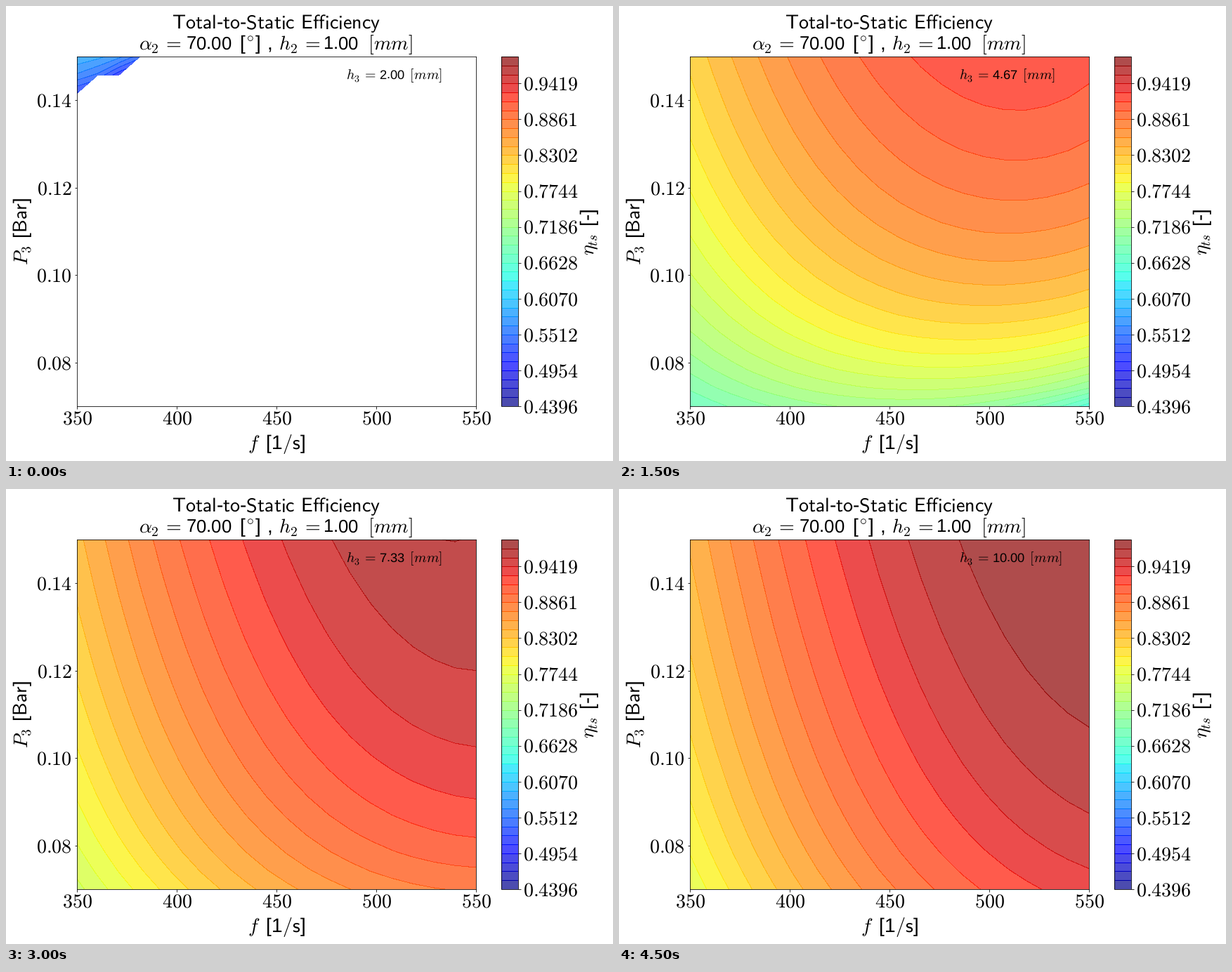
A matplotlib script for the animation above (5000 ms loop, 864 by 648 pixels).

```python
import numpy as np
import matplotlib.pyplot as plt
from matplotlib.animation import FuncAnimation

W, H, DPI = 864, 648, 72
SIZE, NOTE_SIZE = 28, 20
SP = r"\hspace{0.38}"
EQ = r"\hspace{0.18}=\hspace{0.18}"

plt.rcParams.update({
    "font.family": "Liberation Sans",
    "mathtext.fontset": "cm",
    "font.size": SIZE,
    "text.hinting": "none",
})

freq = np.linspace(350, 550, 20)
pres = np.linspace(0.07, 0.15, 20)
F, P = np.meshgrid(freq, pres)
heights = np.linspace(2, 10, 10)
levels = np.linspace(0.43956, 0.98373, 40)


def efficiency(h):
    """Loss-free turbine: only the exit kinetic energy is wasted.

    Velocities are scaled so that the inlet swirl work equals F.
    """
    drop = 554.2 + 95 * np.log(0.15 / P)            # isentropic enthalpy drop
    axial = 3.257 * (0.1 / P) ** 1.73 / h ** 2      # axial exit loss
    blade2 = 3.785e-4 * F ** 2
    rel2 = blade2 + drop * (1 - axial) - F          # squared relative swirl
    rel = np.sqrt(np.where(rel2 >= 0, rel2, np.nan))
    swirl = np.sqrt(blade2) - rel
    eta = 1 - axial - swirl ** 2 / drop
    return np.ma.masked_invalid(np.clip(eta, levels[0], levels[-1]))


fig = plt.figure(figsize=(W / DPI, H / DPI), dpi=DPI, facecolor="white")


def axes_px(x0, y0, x1, y1):
    return fig.add_axes([x0 / W, 1 - y1 / H, (x1 - x0) / W, (y1 - y0) / H])


def label(x, y, s, size=SIZE, ha="center", rotation=0):
    return fig.text(x / W, 1 - y / H, s, fontsize=size, ha=ha, va="baseline",
                    rotation=rotation, rotation_mode="anchor")


def sans(number):
    return r"$\mathdefault{%s}$" % number


def blank(number):
    """Room in a formula for a sans number that is set on its own."""
    em = 0.5 * (len(number) - 1) + 0.278
    return r"\hspace{%.3f}" % (em / 0.878)


ax = axes_px(101, 72, 669, 570)
cax = axes_px(704.6, 72, 729.4, 570)


def fill(h):
    return ax.contourf(F, P, efficiency(h), levels=levels, cmap="jet", alpha=0.7)


contours = fill(heights[0])
bar = fig.colorbar(contours, cax=cax)
bar.solids.set(edgecolor="face", linewidth=0.5, antialiased=True)
bar.set_ticks(levels[::4], labels=[f"${v:.4f}$" for v in levels[::4]])
bar.minorticks_off()

xticks = np.arange(350, 551, 50)
yticks = np.arange(0.08, 0.15, 0.02)
ax.set_xticks(xticks, [f"${v}$" for v in xticks])
ax.set_yticks(yticks, [f"${v:.2f}$" for v in yticks])
ax.tick_params(axis="x", pad=2.5)
ax.set_xlim(350, 550)
ax.set_ylim(0.07, 0.15)

label(384.5, 32, r"$\mathsf{Total}$-$\mathsf{to}$-$\mathsf{Static}" + SP
      + r"\mathsf{Efficiency}$")
label(384.5, 62,
      r"$\alpha_2" + EQ + blank("70.00") + SP
      + r"$[$\hspace{-0.08}{}^\circ\hspace{-0.14}$]$" + SP + "$,$" + SP
      + "h_2" + EQ + blank("1.00") + SP + "[mm]$")
label(256.5, 62, sans("70.00"), 0.92 * SIZE, "left")
label(450.5, 62, sans("1.00"), 0.92 * SIZE, "left")
label(384.5, 631.5, r"$f\hspace{0.5}$[1$\mathsf{/s}$]")
label(31, 321, "$P_3" + SP + r"$[$\mathsf{Bar}$]", rotation=90)
label(838, 321.5, r"$\eta_{ts}" + SP + "$[-]", rotation=90)
note = label(484.5, 104, "", NOTE_SIZE, "left")
value = label(531, 104, "", 0.92 * NOTE_SIZE, "left")


def draw(i):
    global contours
    contours.remove()
    contours = fill(heights[i])
    h = f"{heights[i]:.2f}"
    note.set_text("$h_3" + EQ + blank(h) + SP + "[mm]$")
    value.set_text(sans(h))
    return contours, note, value


anim = FuncAnimation(fig, draw, frames=len(heights), interval=500,
                     repeat=True, repeat_delay=0, blit=False)
plt.show()
```
